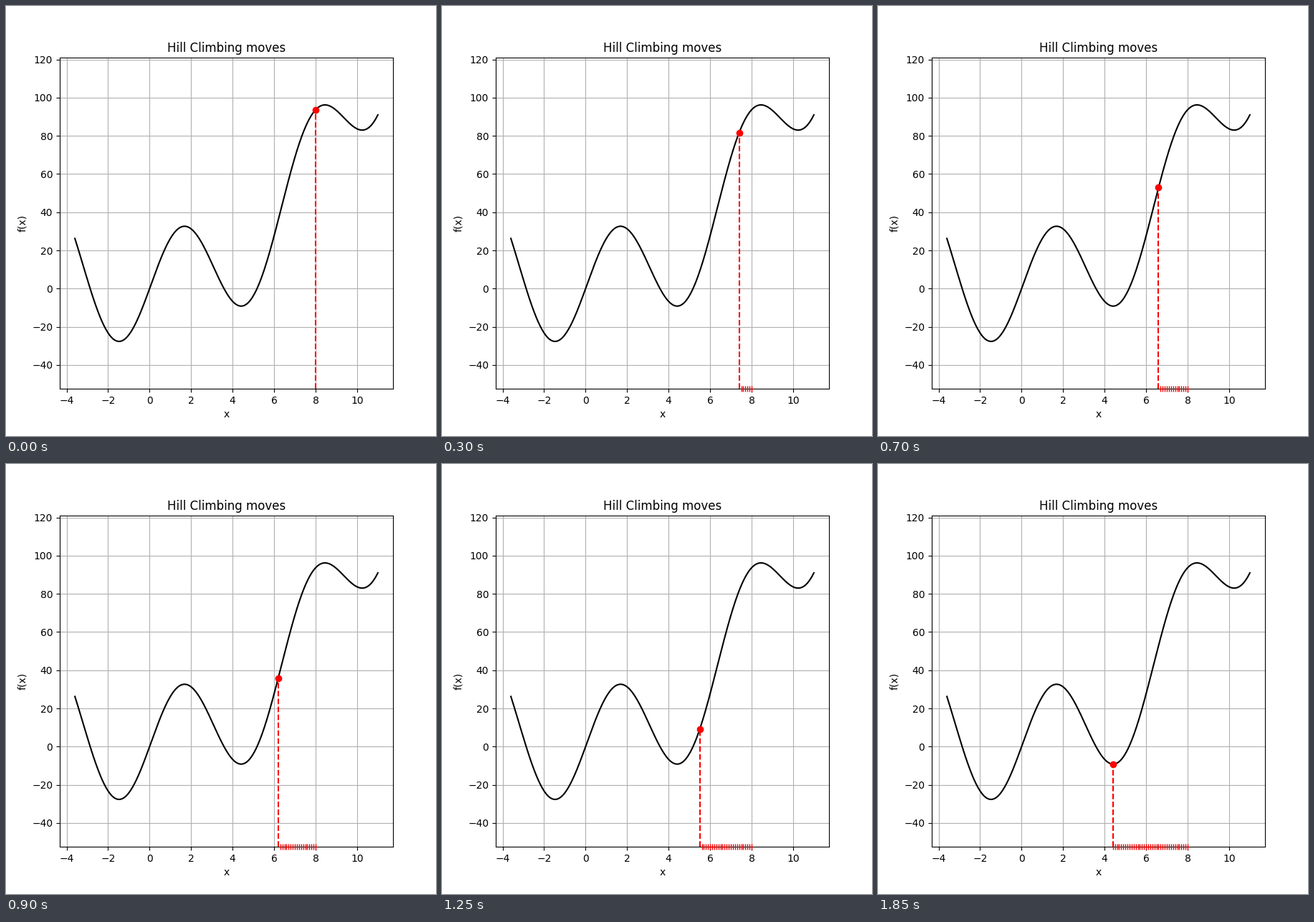
Recreate the animation shown at these times as a matplotlib script. Size 600x600 px, loop 1900 ms.

```python
import numpy as np
import matplotlib.pyplot as plt
from matplotlib.animation import FuncAnimation

FRAMES = 38
START, STEP, MOVES = 8.0, 0.1, 36


def f(x):
    return x**2 + 30 * np.sin(x)


xs = np.linspace(-3.6, 11, 500)
ys = f(xs)
pad = 0.2 * np.ptp(ys)
floor = ys.min() - pad

fig, ax = plt.subplots(figsize=(6, 6), dpi=100)
ax.plot(xs, ys, "k")
ax.set_ylim(floor, ys.max() + pad)
ax.set(title="Hill Climbing moves", xlabel="x", ylabel="f(x)")
ax.grid(True)

trail, = ax.plot([], [], "r|", clip_on=False, zorder=3)
drop, = ax.plot([], [], "r--")
dot, = ax.plot([], [], "ro")


def update(i):
    # the search stops at the local minimum, then marks its last position
    path = START - STEP * np.minimum(np.arange(i + 1), MOVES)
    x, y = path[-1], f(path[-1])
    trail.set_data(path[:-1], np.full(i, floor))
    drop.set_data([x, x], [floor, y])
    dot.set_data([x], [y])
    return trail, drop, dot


anim = FuncAnimation(fig, update, frames=FRAMES, interval=50, repeat=True,
                     repeat_delay=0)
plt.show()
```
